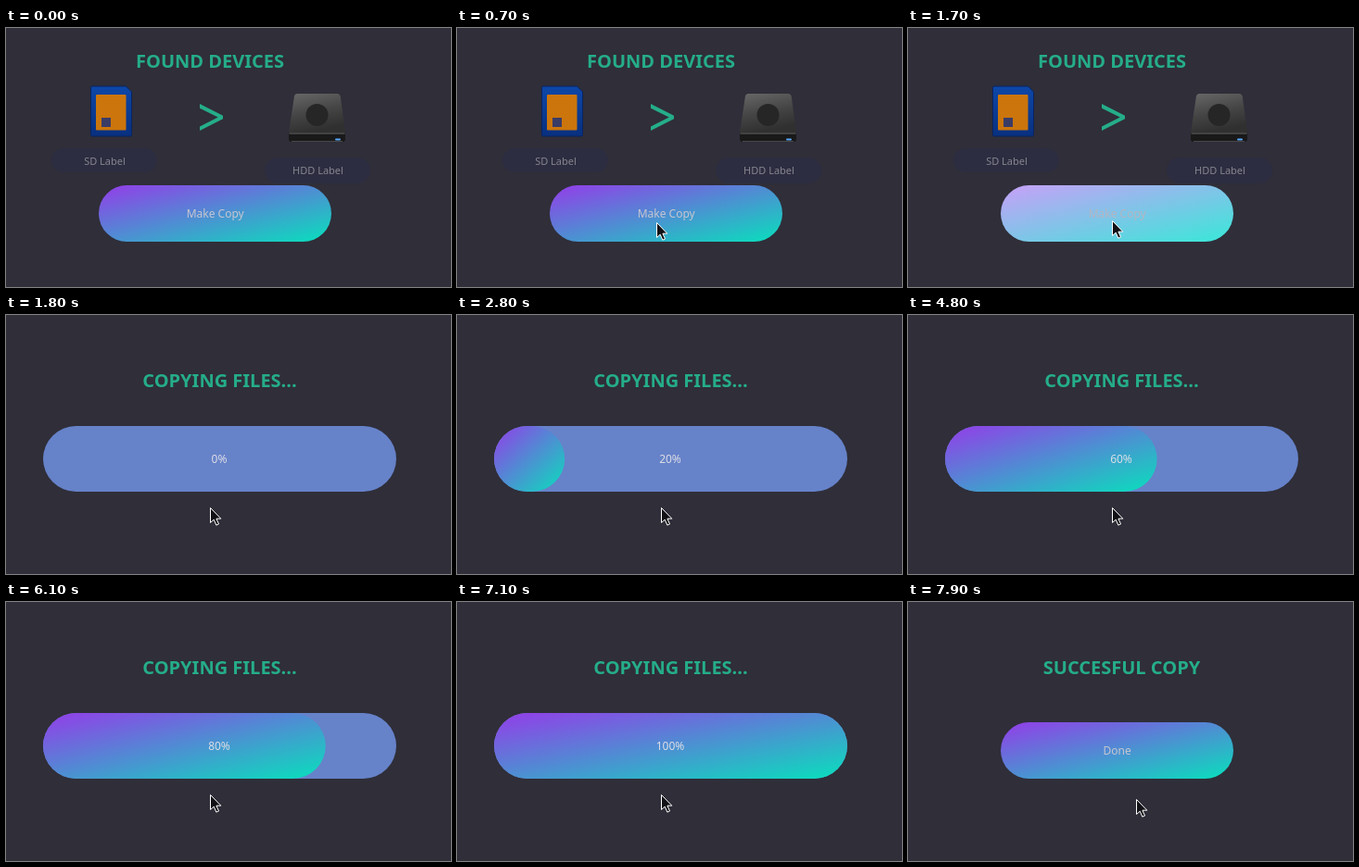
An HTML page that plays this animation: 480 px wide and 280 px high, repeating every 8 s.

```html
<!DOCTYPE html>
<html lang="en">
<head>
<meta charset="utf-8">
<title>Copy devices</title>
<style>
  html, body { margin: 0; width: 100%; height: 100%; overflow: hidden; background: #2f2e39; }
  svg { display: block; width: 480px; height: 280px; }
  text { font: 12px "Noto Sans", "Open Sans", sans-serif; text-anchor: middle; fill: #c6c6d0; }
  .title { font-size: 20px; font-weight: 700; fill: #25ad89; }
  .label { font-size: 11px; fill: #85858f; }
  .pressed rect { fill: url(#light); }
  .pressed text { fill: #b4b6c2; }
</style>
</head>
<body>
<svg viewBox="0 0 480 280" xmlns="http://www.w3.org/2000/svg">
  <defs>
    <linearGradient id="vivid" x2="1" y2="1">
      <stop stop-color="#943ce9"/><stop offset="1" stop-color="#08e0bc"/>
    </linearGradient>
    <linearGradient id="light" x2="1" y2="1">
      <stop stop-color="#c8a0f8"/><stop offset="1" stop-color="#38e8d8"/>
    </linearGradient>
    <linearGradient id="card" x2="0" y2="1">
      <stop stop-color="#0d47a8"/><stop offset="1" stop-color="#08307f"/>
    </linearGradient>
    <linearGradient id="metal" x2=".3" y2="1">
      <stop stop-color="#686868"/><stop offset=".55" stop-color="#454545"/><stop offset="1" stop-color="#303030"/>
    </linearGradient>
  </defs>
  <rect width="480" height="280" fill="#2f2e39"/>

  <g id="devices">
    <text class="title" x="220" y="43">FOUND DEVICES</text>

    <path d="M93 63H129.500L135.500 69V115.500Q135.500 117 134 117H93Q91.500 117 91.500 115.500V64.500Q91.500 63 93 63Z"
          fill="url(#card)" stroke="#0a2460"/>
    <rect x="97" y="72" width="32.500" height="38.500" rx="1" fill="#cb750c"/>
    <rect x="103" y="97" width="10" height="10" fill="#3b3c66"/>

    <path d="M209 82L234 94.800V98.200L209 111V106.600L228.700 96.600L209 86.800Z" fill="#25ad89"/>

    <path d="M314 71H357.500Q360 71 360.700 73.500L366 113H305L311 73.500Q311.500 71 314 71Z" fill="url(#metal)"/>
    <path d="M305 113H366V120Q366 123 363 123H308Q305 123 305 120Z" fill="#191919"/>
    <path d="M305.500 114H365.500" stroke="#858585" stroke-width=".8"/>
    <path d="M308 122.500H363" stroke="#555" stroke-width=".8"/>
    <rect x="355" y="119.500" width="6" height="2" rx="1" fill="#58a8ff"/>
    <circle cx="335.500" cy="94" r="12" fill="#262626"/>

    <rect x="49" y="130" width="114" height="26" rx="13" fill="#2d2d41"/>
    <text class="label" x="106.500" y="148">SD Label</text>
    <rect x="279" y="140" width="114" height="28" rx="14" fill="#2d2d41"/>
    <text class="label" x="336.500" y="158">HDD Label</text>

    <g id="copyButton">
      <rect x="100" y="170" width="251" height="61" rx="30.500" fill="url(#vivid)"/>
      <text x="225.700" y="205">Make Copy</text>
    </g>
  </g>

  <g id="copying">
    <text class="title" x="230.500" y="78">COPYING FILES...</text>
    <rect x="40" y="120" width="381" height="71" rx="35.500" fill="#6682c9"/>
    <rect id="bar" x="40" y="120" width="0" height="71" rx="35.500" fill="url(#vivid)"/>
    <text id="percent" x="230" y="160" style="fill:#dddde6"></text>
  </g>

  <g id="done">
    <text class="title" x="230.500" y="78">SUCCESFUL COPY</text>
    <rect x="100" y="130" width="251" height="61" rx="30.500" fill="url(#vivid)"/>
    <text x="225.700" y="165">Done</text>
  </g>

  <path id="cursor" d="M.5 .5V16.500L4.200 13.200L6.800 19.200L9.500 18L6.900 12.200H11.800Z"
        fill="#111116" stroke="#fff" stroke-linejoin="round"/>
</svg>

<script>
  const LOOP = 8000;
  const PRESS = 1700, START = 1800, FINISH = 7300;
  const STEPS = [2800, 3700, 4700, 5500, 6600];   // each adds 20%
  const CURSOR_SHOWN = 300;
  const CURSOR_PATH = [                            // time, x, y
    [300, 231, 205], [700, 215, 210], [1000, 215, 210], [1500, 220, 208],
    [7400, 220, 208], [7900, 246, 213]
  ];

  const el = id => document.getElementById(id);
  const show = (id, on) => el(id).setAttribute('display', on ? 'inline' : 'none');
  const ease = k => k * k * (3 - 2 * k);

  function cursorAt(t) {
    const next = CURSOR_PATH.findIndex(p => p[0] > t);
    if (next < 0) return CURSOR_PATH[CURSOR_PATH.length - 1].slice(1);
    if (next === 0) return CURSOR_PATH[0].slice(1);
    const [t0, x0, y0] = CURSOR_PATH[next - 1];
    const [t1, x1, y1] = CURSOR_PATH[next];
    const k = ease((t - t0) / (t1 - t0));
    return [x0 + (x1 - x0) * k, y0 + (y1 - y0) * k].map(Math.round);
  }

  function render(t) {
    show('devices', t < START);
    show('copying', t >= START && t < FINISH);
    show('done', t >= FINISH);
    el('copyButton').classList.toggle('pressed', t >= PRESS);

    const percent = 20 * STEPS.filter(s => t >= s).length;
    el('bar').setAttribute('width', 381 * percent / 100);
    el('percent').textContent = percent + '%';

    show('cursor', t >= CURSOR_SHOWN);
    el('cursor').setAttribute('transform', `translate(${cursorAt(t)})`);
  }

  function tick() {
    render(performance.now() % LOOP);
    requestAnimationFrame(tick);
  }
  tick();
</script>
</body>
</html>
```
